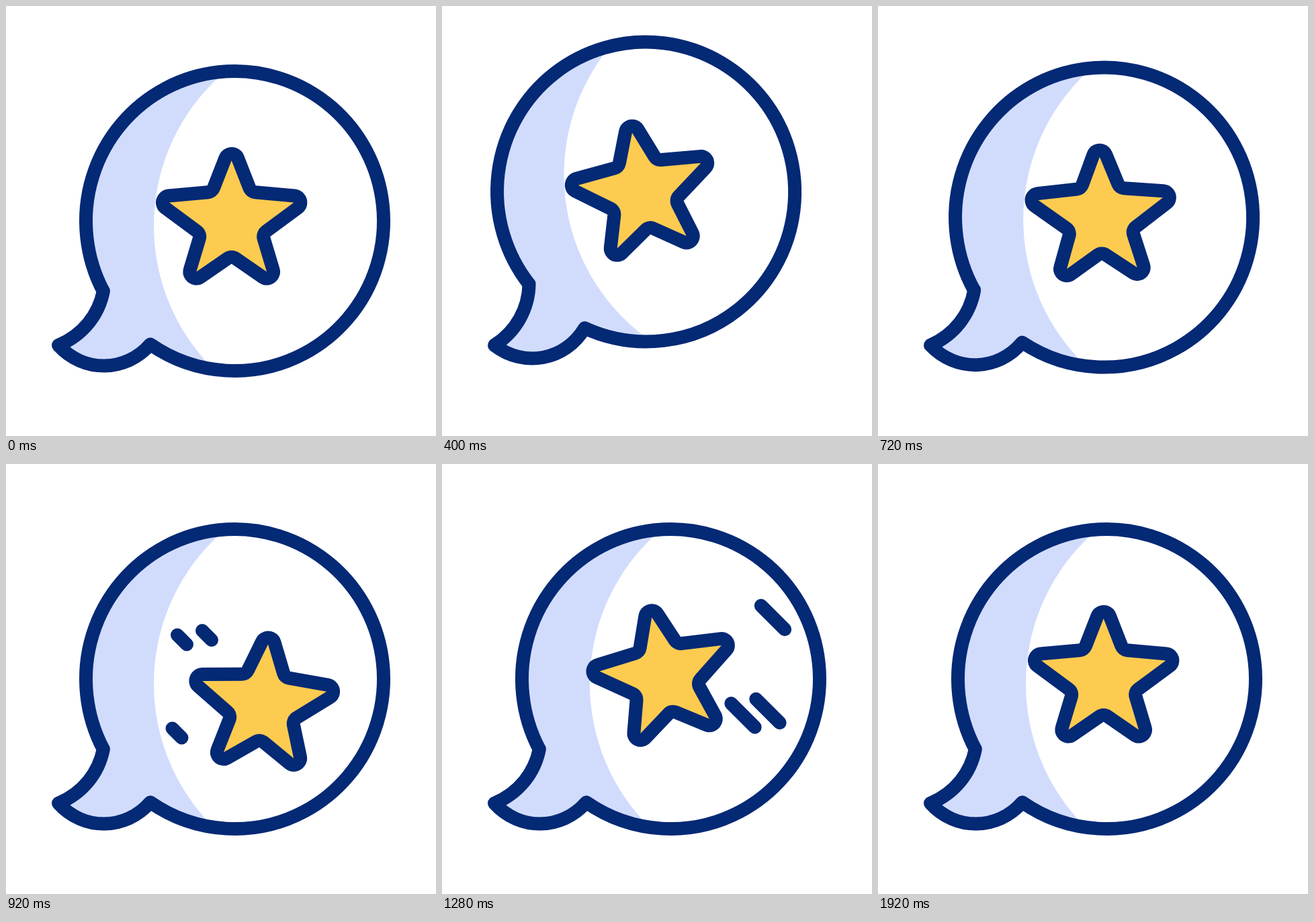
Write an HTML page with a canvas that moves like this. It is 640 px wide and 640 px high and loops after 2 s.

```html
<!DOCTYPE html>
<html lang="en">
<head>
<meta charset="utf-8">
<title>Star bubble</title>
<style>
  html, body { margin: 0; width: 100%; height: 100%; overflow: hidden; background: #fff; }
  canvas { display: block; width: 100vmin; height: 100vmin; }
</style>
</head>
<body>
<canvas id="stage" width="640" height="640"></canvas>
<script>
const ctx = document.getElementById('stage').getContext('2d');
const NAVY = '#042975', PALE = '#d1dcfd', GOLD = '#fdcb50';
const LOOP = 2000, STEP = 40, RAD = Math.PI / 180;

// Tracks are [time, value] pairs joined by a sine ease.
const bubbleTurn = [[100, 0], [280, 9.1], [420, -11.2], [580, 4], [740, -1.4], [880, 0]];
const starShift = [[720, 0], [960, 50], [1540, -44], [1800, 0]];
const starTurn = [[720, 0], [960, 5.2], [1280, -12], [1570, 8], [1800, 0]];
const dashOut = [[800, 0], [880, 18], [950, 0]];
const dashBack = [[1190, 0], [1275, 17.8], [1370, 0]];

const PIVOT = [78, 505];
const STAR = [335.7, 320.8];
const DASHES = [[492.5, 228.5], [448, 374], [485, 367.5]];

// Right half of the star, alternating tips and notches.
const half = [[0, -90.8], [36, -53.5], [92.7, -28.3], [57.5, 22.5], [52.3, 74.7], [0, 63]];
const corners = half.concat(half.slice(1, 5).reverse().map(([x, y]) => [-x, y]));

function track(keys, t) {
  if (t <= keys[0][0]) return keys[0][1];
  for (let i = 1; i < keys.length; i++) {
    const [t0, a] = keys[i - 1], [t1, b] = keys[i];
    if (t < t1) return a + (b - a) * (1 - Math.cos(Math.PI * (t - t0) / (t1 - t0))) / 2;
  }
  return keys[keys.length - 1][1];
}

function makeBubble() {
  const p = new Path2D();
  p.ellipse(340.5, 320, 221.5, 223, 0, 152.2 * RAD, 484.6 * RAD);
  p.bezierCurveTo(178, 546, 115, 546, ...PIVOT);
  p.bezierCurveTo(114, 490, 138, 460, 145, 424);
  p.closePath();
  return p;
}

// Round every corner with an arc; the arcs are joined by their common tangents.
function makeStar(r) {
  const p = new Path2D(), n = corners.length;
  const normals = corners.map(([x, y], i) => {
    const [u, v] = corners[(i + 1) % n];
    const side = i % 2 ? -1 : 1;
    return Math.atan2(v - y, u - x) - Math.acos(side * 2 * r / Math.hypot(u - x, v - y));
  });
  corners.forEach(([x, y], i) => {
    const notch = i % 2 === 1, flip = notch ? Math.PI : 0;
    p.arc(x, y, r, normals[(i + n - 1) % n] + flip, normals[i] + flip, notch);
  });
  p.closePath();
  return p;
}

const bubble = makeBubble(), star = makeStar(10);

function drawBubble() {
  ctx.save();
  ctx.clip(bubble);
  ctx.fillStyle = PALE;
  ctx.fillRect(-100, -100, 840, 840);
  ctx.fillStyle = '#fff';
  ctx.beginPath();
  ctx.arc(521, 327, 301, 0, 2 * Math.PI);
  ctx.fill();
  ctx.restore();
  ctx.stroke(bubble);
}

function drawDashes(len, place) {
  if (len < 0.3) return;
  ctx.beginPath();
  for (const dash of DASHES) {
    const [x, y] = place(dash);
    ctx.moveTo(x - len, y - len);
    ctx.lineTo(x + len, y + len);
  }
  ctx.stroke();
}

function drawStar(t) {
  const d = track(starShift, t);
  ctx.save();
  ctx.translate(STAR[0] + d, STAR[1] + d * 0.82);
  ctx.rotate(track(starTurn, t) * RAD);
  ctx.fillStyle = GOLD;
  ctx.fill(star);
  ctx.stroke(star);
  ctx.restore();
}

function draw(t) {
  ctx.fillStyle = '#fff';
  ctx.fillRect(0, 0, 640, 640);
  ctx.strokeStyle = NAVY;
  ctx.lineWidth = 20;
  ctx.lineCap = ctx.lineJoin = 'round';
  ctx.save();
  ctx.translate(...PIVOT);
  ctx.rotate(track(bubbleTurn, t) * RAD);
  ctx.translate(-PIVOT[0], -PIVOT[1]);
  drawBubble();
  drawDashes(track(dashOut, t), ([x, y]) => [747 - x, 629 - y]);
  drawDashes(track(dashBack, t), p => p);
  drawStar(t);
  ctx.restore();
}

let start = null;
function tick(now) {
  if (start === null) start = now;
  const t = (now - start) % LOOP;
  draw(Math.floor(t / STEP) * STEP);
  requestAnimationFrame(tick);
}
draw(0);
requestAnimationFrame(tick);
</script>
</body>
</html>
```
